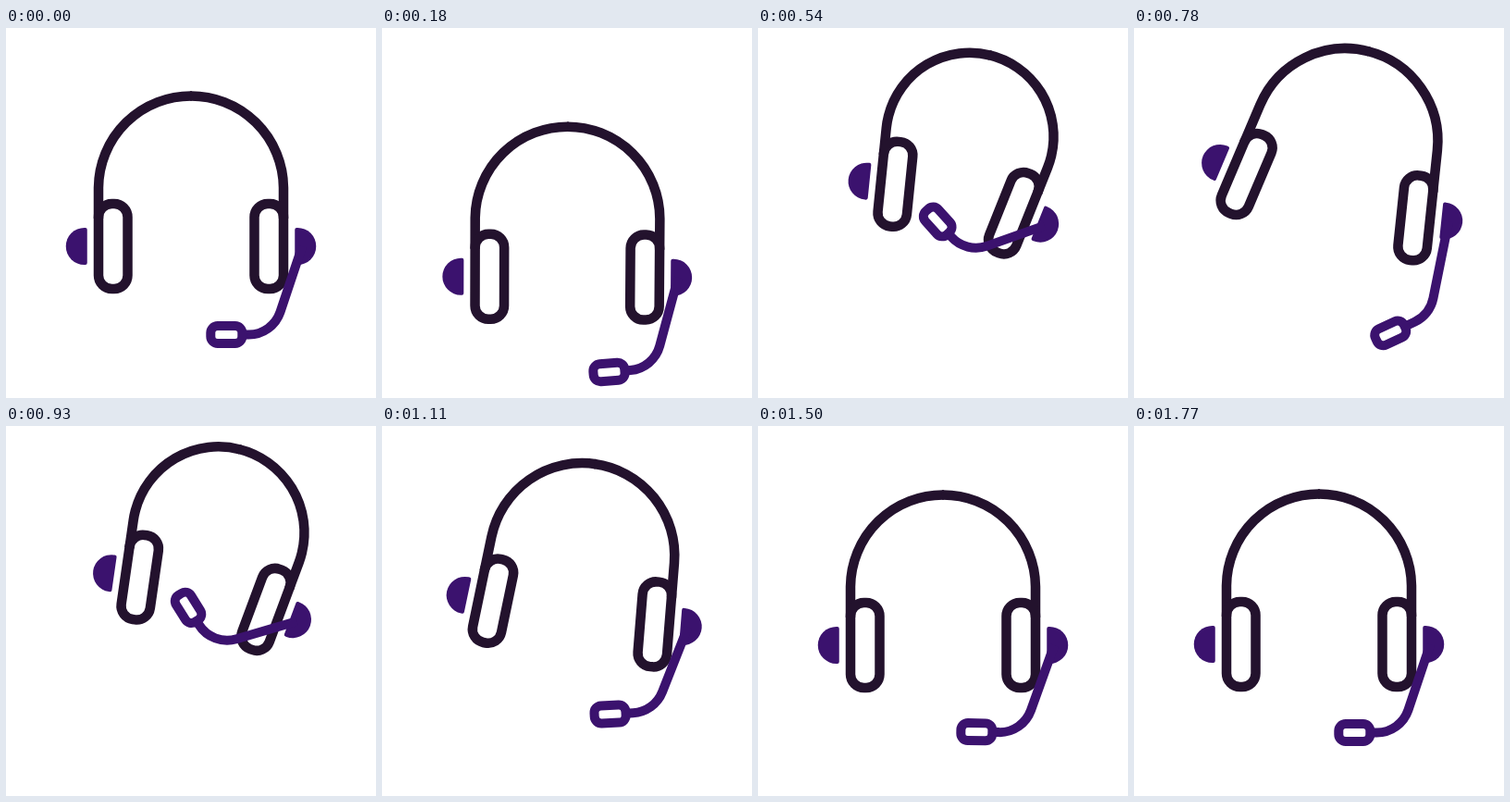
Recreate the animation shown at these times as an HTML page with a canvas. Size 400 by 400 pixels, loop 3.8 s.

```html
<!DOCTYPE html>
<html lang="en">
<head>
<meta charset="utf-8">
<title>Headset</title>
<style>
  html, body { margin: 0; width: 100%; height: 100%; overflow: hidden; background: #fff; }
  canvas { display: block; width: 100vmin; height: 100vmin; }
</style>
</head>
<body>
<canvas id="stage"></canvas>
<script>
const LOOP = 3800, STEP = 30, SIZE = 400;
const DARK = '#23122d', PURPLE = '#3b126e';
const HALF_CUP = 15.75;

const canvas = document.getElementById('stage');
const ctx = canvas.getContext('2d');
const rad = deg => deg * Math.PI / 180;

// time, lean, squeeze, rise, boom angle, mic tilt, boom length, mic reach
const KEYS = [
  [0, 0, 0, 0, 18.5, 0, 100.7, 50],
  [150, 0, 0, 36, 14, -5, 102, 49],
  [330, 5.6, 3.2, -15, 36.7, 0, 95, 44],
  [540, 13.8, 8, -53, 70.5, 48, 90, 46],
  [570, 14.2, 8.2, -55, 73, 51, 91, 46],
  [750, 14.6, -8.6, -56, 8, -27, 105, 47],
  [780, 14.5, -8.5, -56, 11.4, -25, 103, 47],
  [930, 14.3, 6.1, -56.6, 73.6, 58, 95.6, 49],
  [1080, 10, -4, -43.5, 26, 0, 98, 48],
  [1230, 0, 0, 14.5, 11, -9, 101, 48],
  [1290, 0, 0, 12, 16.2, -5, 99.7, 48.6],
  [1440, 0, 0, 2, 20.5, 2, 100, 50],
  [1620, 0, 0, 0, 17.5, -2, 101.5, 50],
  [1770, 0, 0, 0, 18.5, 0, 100.7, 50]
];

const slope = (i, c) => (KEYS[i + 1][c] - KEYS[i][c]) / (KEYS[i + 1][0] - KEYS[i][0]);

// Flat at turning points, smooth elsewhere
function tangent(i, c) {
  if (i === 0 || i === KEYS.length - 1) return 0;
  const a = slope(i - 1, c), b = slope(i, c);
  return a * b <= 0 ? 0 : 2 * a * b / (a + b);
}

function poseAt(t) {
  const last = KEYS.length - 1;
  if (t >= KEYS[last][0]) return KEYS[last].slice(1);
  let i = 0;
  while (t >= KEYS[i + 1][0]) i++;
  const span = KEYS[i + 1][0] - KEYS[i][0];
  const u = (t - KEYS[i][0]) / span, v = 1 - u;
  return KEYS[i].slice(1).map((p, n) => {
    const c = n + 1, q = KEYS[i + 1][c];
    return p * (1 + 2 * u) * v * v + q * u * u * (3 - 2 * u)
      + span * u * v * (tangent(i, c) * v - tangent(i + 1, c) * u);
  });
}

function strokeBox(x, y, w, h, r) {
  ctx.beginPath();
  ctx.roundRect(x - w / 2, y - h / 2, w, h, r);
  ctx.stroke();
}

// Half the band, one cup and its outer cap, drawn for the right side
function drawSide(r, leg, bend) {
  ctx.strokeStyle = DARK;
  ctx.lineWidth = 10.5;
  ctx.beginPath();
  ctx.arc(0, 0, r, -Math.PI / 2 - bend - 0.01, 0);
  ctx.lineTo(r, leg - 30);
  ctx.stroke();

  ctx.translate(r - HALF_CUP, leg);
  strokeBox(0, 0, HALF_CUP * 2, 92, 14.5);

  ctx.fillStyle = PURPLE;
  ctx.beginPath();
  ctx.moveTo(31, -20);
  ctx.arc(31, 0, 20, -Math.PI / 2, Math.PI / 2);
  ctx.arcTo(28, 20, 28, 0, 2);
  ctx.arcTo(28, -20, 31, -20, 2);
  ctx.fill();
}

function drawBoom(x, y, angle, tilt, length, reach) {
  const kx = x - length * Math.sin(angle), ky = y + length * Math.cos(angle);
  const dx = Math.cos(tilt), dy = Math.sin(tilt);
  const mx = kx - reach * dx, my = ky - reach * dy;
  ctx.strokeStyle = PURPLE;
  ctx.lineWidth = 10;
  ctx.beginPath();
  ctx.moveTo(x, y);
  ctx.arcTo(kx, ky, mx, my, 36);
  ctx.lineTo(mx + 17 * dx, my + 17 * dy);
  ctx.stroke();

  ctx.translate(mx, my);
  ctx.rotate(tilt);
  strokeBox(0, 0, 34, 19, 7.5);
}

function draw(t) {
  const [lean, squeeze, rise, angle, tilt, length, reach] = poseAt(t);
  const bend = rad(squeeze);
  const r = 100 - 1.17 * Math.max(squeeze, 0);
  const leg = 62.5 - squeeze * (squeeze > 0 ? 0.4 : 1.45);
  const drop = (r - HALF_CUP) * Math.sin(bend) + leg * Math.cos(bend);
  const scale = canvas.width / SIZE;

  ctx.setTransform(scale, 0, 0, scale, 0, 0);
  ctx.fillStyle = '#fff';
  ctx.fillRect(0, 0, SIZE, SIZE);

  let joint;
  for (const side of [-1, 1]) {
    ctx.save();
    ctx.translate(200, 288 + rise);
    ctx.rotate(rad(lean));
    ctx.translate(0, -52 - drop);
    ctx.scale(side, 1);
    ctx.rotate(bend);
    drawSide(r, leg, bend);
    joint = new DOMPoint(36, 0).matrixTransform(ctx.getTransform());
    ctx.restore();
  }
  drawBoom(joint.x / scale, joint.y / scale, rad(angle), rad(tilt), length, reach);
}

function resize() {
  const side = Math.min(innerWidth, innerHeight) || SIZE;
  canvas.width = canvas.height = Math.round(side * (devicePixelRatio || 1));
}

function tick() {
  const t = performance.now() % LOOP;
  draw(Math.floor(t / STEP) * STEP);
  requestAnimationFrame(tick);
}

addEventListener('resize', resize);
resize();
tick();
</script>
</body>
</html>
```
